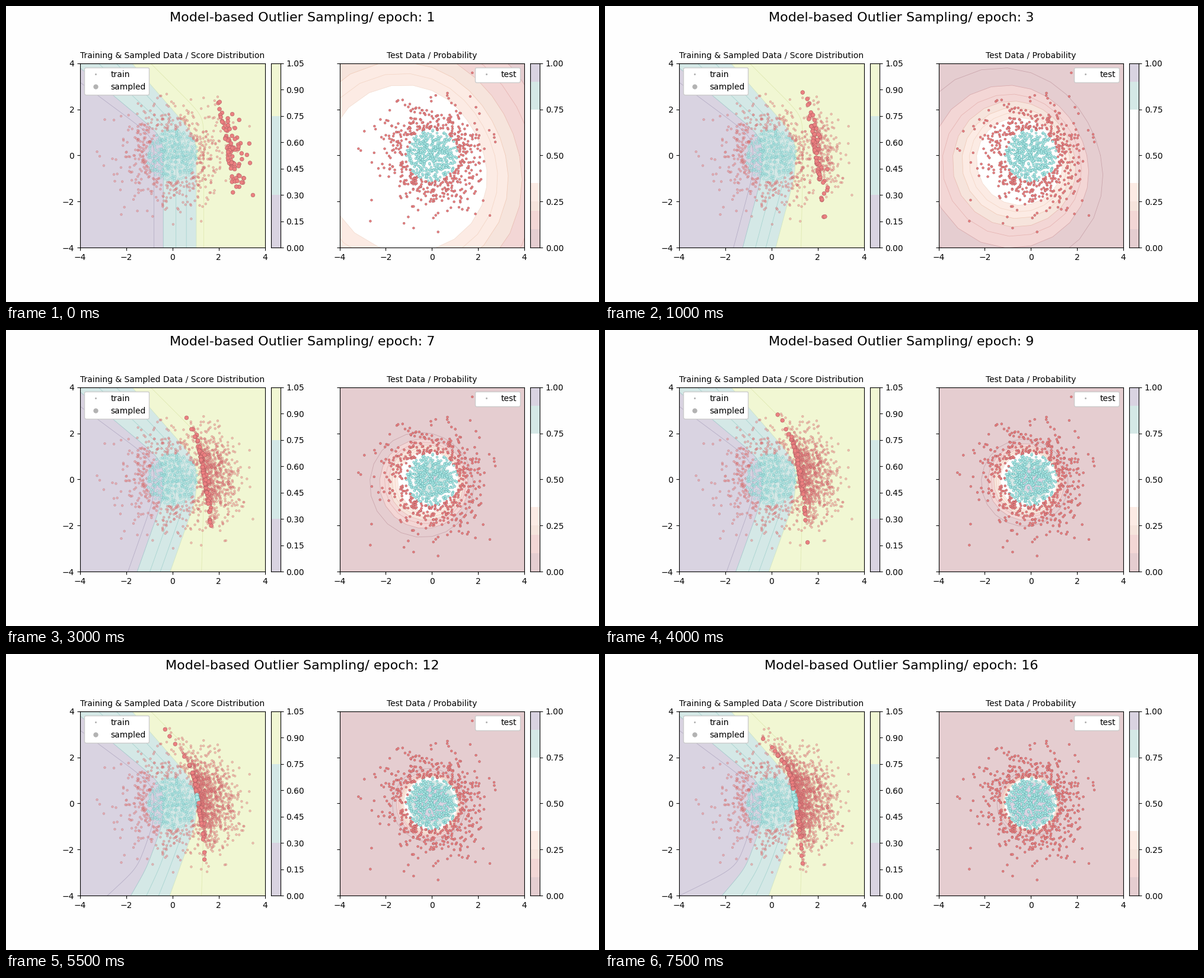
A matplotlib script that plays this animation: 1000 by 500 pixels, repeating every 8000 ms.

```python
import numpy as np
import matplotlib.pyplot as plt
from matplotlib.animation import FuncAnimation

EPOCHS = 16
W, H = 1000, 500
SIDE, BOTTOM, BAR = 311.6, 91.7, 15.6
PURPLE, TEAL, YELLOW = "#d9d3e1", "#d4e8e6", "#f1f7d3"
ROSE, PINK, PEACH, CREAM = "#e5cdd0", "#f3d6d5", "#f6e4dc", "#fcebe4"
RED, CYAN = (0.92, 0.50, 0.50), (0.69, 0.92, 0.91)
RED_EDGE, CYAN_EDGE = (0.68, 0.36, 0.38), (0.40, 0.69, 0.69)
DISC = 1.12

HEIGHT = np.linspace(-4, 4, 81)
THETA = np.linspace(0, 2 * np.pi, 25)
LOBE = np.cos(THETA - np.radians(208))
RING_STEPS = [0, .35, .53, .67, .8, .9, 1]

# One entry per score level, .15 to .90
TIP = [-.8, -.4, .15, .6, 1.03, 1.35]
UP_SLOPE = [1.35, 1.2, 1.05, .95, .87, 1]
UP_START = [.8, .8, .8, .8, .8, 1.7]
DOWN_SLOPE = [.36, .36, .36, .36, .36, .03]
LATE_SLOPE = [1.7, .5, .25, .1, 0, 0]


def bend(t):
    """Smooth version of max(t, 0)."""
    return np.log1p(np.exp(5 * t)) / 5


def score_curves(e):
    lean = 1 - np.exp((1 - e) / 1.5)
    late = np.clip((e - 9) / 7, 0, 1)
    return [tip - up * bend(HEIGHT - start) - lean * down * bend(-HEIGHT - .8)
            - late * sweep * bend(-HEIGHT - 2.8)
            for tip, up, start, down, sweep
            in zip(TIP, UP_SLOPE, UP_START, DOWN_SLOPE, LATE_SLOPE)]


def rings(e):
    slow, fast = np.exp((1 - e) / 4), np.exp(1 - e)
    outer = 1.33 + 4 * slow + 3.6 * fast + 2.3 * slow * LOBE
    inner = 1.12 + .85 * slow + 1.48 * fast + (.85 * slow + .5 * fast) * LOBE
    return [outer + (inner - outer) * k for k in RING_STEPS]


def cores(e):
    """Radii of the teal and purple discs."""
    return [1.05 * (1 - np.exp(-max(e - 3, 0) / 3)),
            1 - np.exp(-max(e - 6, 0) / 4)]


def cloud(seed):
    return np.random.default_rng(seed).normal(size=(950, 2))


def sample(e):
    rng = np.random.default_rng(40 + e)
    y = rng.normal(.25, 1.05, 90)
    front = .95 + 1.4 * np.exp((1 - e) / 5) - .16 * y
    front -= .045 * e * bend(y - 1.5) + .1 * bend(-y - 1.3)
    spread = .03 + .22 * np.exp((1 - e) / 1.5)
    return np.column_stack([front + rng.exponential(spread, 90), y])


TRAIN, TEST = cloud(4), cloud(9)
SAMPLES = [sample(e) for e in range(1, EPOCHS + 1)]

fig = plt.figure(figsize=(W / 100, H / 100), dpi=100, facecolor="#fefefe")
title = fig.suptitle("", fontsize=16)


def panel(x, name):
    ax = fig.add_axes([x / W, BOTTOM / H, SIDE / W, SIDE / H])
    ax.set(xlim=(-4, 4), ylim=(-4, 4), xticks=range(-4, 5, 2), yticks=range(-4, 5, 2))
    ax.set_title(name, fontsize=10)
    return ax


def colour_bar(x, edges, colours, ticks):
    ax = fig.add_axes([x / W, BOTTOM / H, BAR / W, SIDE / H])
    ax.set(xlim=(0, 1), ylim=(0, edges[-1]), xticks=[])
    for lo, hi, c in zip(edges, edges[1:], colours):
        ax.axhspan(lo, hi, color=c, lw=0)
    ax.yaxis.tick_right()
    ax.set_yticks(ticks, [f"{t:.2f}" for t in ticks])


def area(ax, colour, z):
    return ax.fill([0, 0, 0], [0, 0, 0], color=colour, lw=0, zorder=z)[0]


def contour(ax, colour):
    return ax.plot([], [], color=colour, lw=.55, zorder=2)[0]


def dots(ax, size, z, alpha=1):
    return ax.scatter([], [], s=size, linewidths=.4, alpha=alpha, zorder=z)


def place(scatter, pts):
    inside = (np.hypot(*pts.T) < DISC)[:, None]
    scatter.set_offsets(pts)
    scatter.set_facecolors(np.where(inside, CYAN, RED))
    scatter.set_edgecolors(np.where(inside, CYAN_EDGE, RED_EDGE))


def key(ax, loc, *items):
    marks = [ax.plot([], [], "o", ls="", ms=ms, color="#b3b3b3", mew=0, label=s)[0]
             for s, ms in items]
    ax.legend(handles=marks, loc=loc, framealpha=1).set_zorder(6)


left = panel(125, "Training & Sampled Data / Score Distribution")
right = panel(562.5, "Test Data / Probability")
right.tick_params(labelleft=False)
colour_bar(447, [0, .3, .75, 1.05], [PURPLE, TEAL, YELLOW], np.arange(8) * .15)
colour_bar(884.4, [0, .1, .2, .25, .35, .75, .9, 1],
           [ROSE, PINK, PEACH, CREAM, "white", TEAL, PURPLE], np.arange(5) / 4)
key(left, "upper left", ("train", 2.2), ("sampled", 6))
key(right, "upper right", ("test", 2.2))

left.set_facecolor(PURPLE)
teal_area, yellow_area = area(left, TEAL, 1), area(left, YELLOW, 1.1)
score_lines = [contour(left, c) for c in
               ("#b3abc4", "#a3c6cb", "#a5d3cf", "#a5d3cf", "#cfe5c4", "#dfe8b0")]
train_dots = dots(left, 7, 3, .45)
sampled_dots = dots(left, 23, 4)

right.set_facecolor(ROSE)
ring_areas = [(i, area(right, c, 1 + i / 10)) for i, c in
              ((1, PINK), (3, PEACH), (4, CREAM), (6, "white"))]
core_areas = [area(right, TEAL, 1.8), area(right, PURPLE, 1.9)]
ring_lines = [contour(right, c) for c in
              ("#c9a3aa", "#d8a8ab", "#e6b3b1", "#e9bdb2", "#f0cbb8", "#f3d5c5", "#f3dccf")]
place(dots(right, 7, 3), TEST)


def polar(r):
    return np.column_stack([r * np.cos(THETA), r * np.sin(THETA)])


def right_of(x):
    return np.vstack([np.column_stack([x, HEIGHT]), [(5, 4), (5, -4)]])


def update(frame):
    e = frame + 1
    title.set_text(f"Model-based Outlier Sampling/ epoch: {e}")

    curves = score_curves(e)
    for line, x in zip(score_lines, curves):
        line.set_data(x, HEIGHT)
    teal_area.set_xy(right_of(curves[1]))
    yellow_area.set_xy(right_of(curves[4]))
    place(train_dots, np.vstack([TRAIN] + SAMPLES[:frame]))
    place(sampled_dots, SAMPLES[frame])

    bands = [polar(r) for r in rings(e)]
    for line, xy in zip(ring_lines, bands):
        line.set_data(*xy.T)
    for i, patch in ring_areas:
        patch.set_xy(bands[i])
    for patch, r in zip(core_areas, cores(e)):
        patch.set_xy(polar(r))
    return []


anim = FuncAnimation(fig, update, frames=EPOCHS, interval=500, repeat=True, repeat_delay=0)
plt.show()
```
